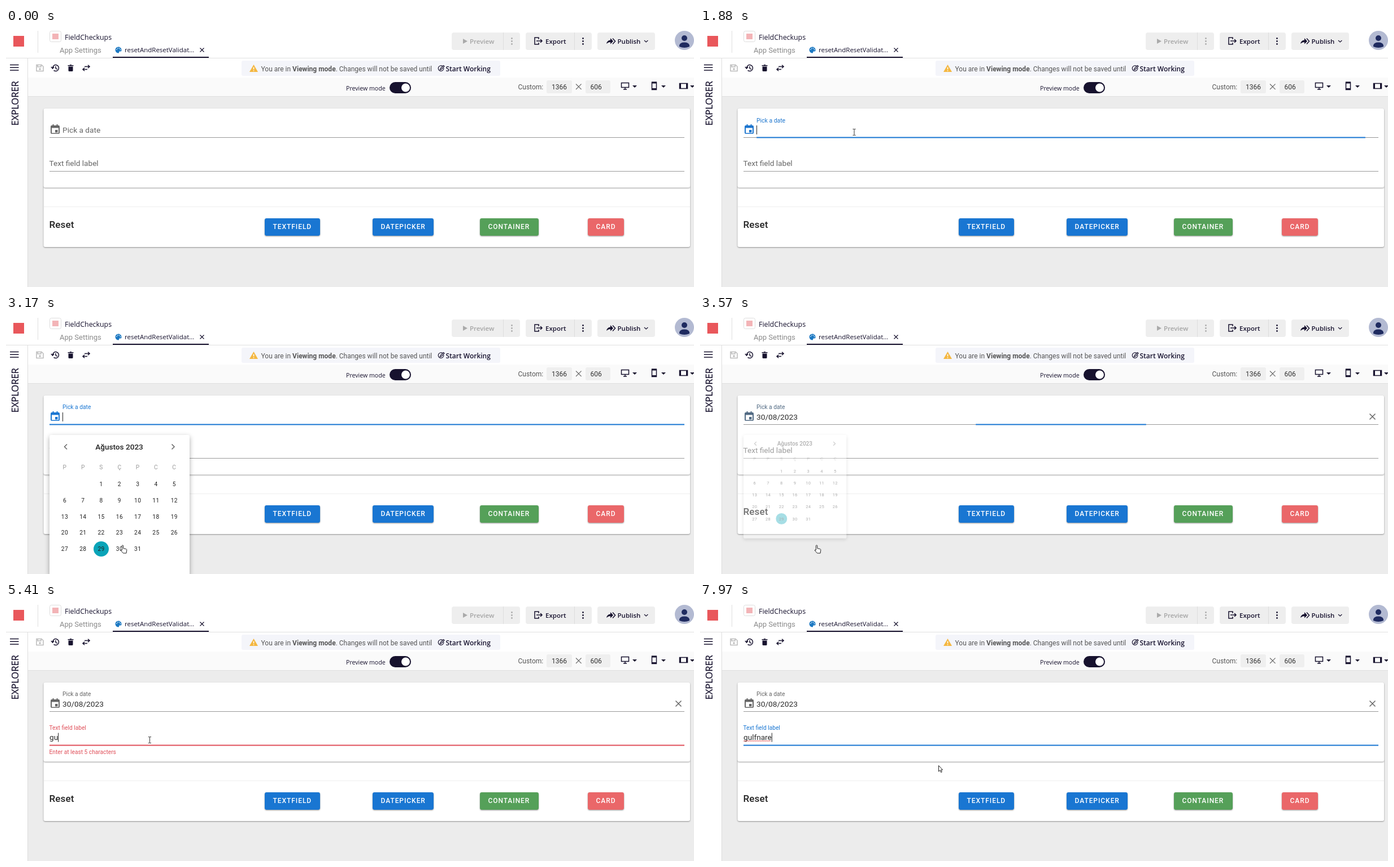
Recreate the animation shown at these times as an HTML page. Size 1218 by 460 pixels, loop 8000 ms.

```html
<!DOCTYPE html>
<html lang="en">
<head>
<meta charset="utf-8">
<style>
html, body { margin: 0; width: 100%; height: 100%; overflow: hidden; background: #ececec; }
svg { display: block; width: 100vw; height: 100vh; }
text { font-family: Roboto, sans-serif; font-size: 12px; fill: #555; white-space: pre; }
.ui { font-family: "Open Sans", sans-serif; font-size: 11.5px; fill: #17122e; }
.semi { font-weight: 600; }
.raised { filter: drop-shadow(0 1.5px 1px #0006); }
.popup { filter: drop-shadow(0 3px 4px #0005); }
.line { fill: none; stroke: #17122e; stroke-width: 1.5; }
.grey { stroke: #666; }
.dark { fill: #17122e; }
.btn text { font-size: 12px; font-weight: 500; letter-spacing: .95px; fill: #fff; }
#date text { font-size: 13.7px; }
#field text { font-size: 13.6px; }
#date .value, #field .value { fill: #2b2b2b; }
#field .error { font-size: 10.2px; fill: #e0505a; }
#popup text { text-anchor: middle; font-size: 10.2px; letter-spacing: .4px; fill: #222; }
#popup .week { fill: #999; }
#popup .month { font-size: 13.6px; font-weight: 500; letter-spacing: 0; }
</style>
</head>
<body>
<svg viewBox="0 0 1218 460" preserveAspectRatio="none">
  <!-- header -->
  <rect width="1218" height="122" fill="#fff"/>
  <rect x="39" y="88" width="1179" height="33" fill="#fafafa"/>
  <path d="M0 53.5H1218M39 121.5H1218M56.5 5V44" stroke="#e0e0e0"/>
  <rect x="13" y="14" width="19" height="19" fill="#e9575b"/>
  <rect x="77.500" y="5.500" width="20" height="19" rx="3" fill="#fff" stroke="#ddd"/>
  <rect x="82" y="10" width="11" height="10" fill="#f3b4b7"/>
  <text class="ui" x="104" y="21" style="font-size:12.4px">FieldCheckups</text>
  <text x="95" y="43.500" style="font-size:13px;fill:#8a8a8a">App Settings</text>
  <path d="M199 33.500a5.500 5.500 0 1 0 0 11c2 0 .5-2.500 2-3h2q2-.5 1.500-3a5.500 5.500 0 0 0-5.500-5z" fill="#1b78c2"/>
  <path d="M196 38h0M198 36h0M201 36h0M202.500 38.500h0" stroke="#fff" stroke-width="1.700" stroke-linecap="round"/>
  <text class="ui" x="210" y="43">resetAndResetValidat...</text>
  <path class="line" stroke-width="1" d="M343.500 35.500l7 7m0-7l-7 7" style="stroke-width:1.200"/>
  <rect class="dark" x="189" y="51" width="170" height="2"/>

  <g fill="#eee">
    <rect x="789" y="8" width="121" height="31" rx="4"/>
    <rect x="920" y="8" width="117" height="31" rx="4"/>
    <rect x="1047" y="8" width="102" height="31" rx="4"/>
  </g>
  <path d="M880.500 8v31M1006.500 8v31" stroke="#ddd"/>
  <path d="M809 19l8 4.500-8 4.500z" fill="#aaa"/>
  <text class="ui semi" x="821" y="28" style="fill:#a5a5a5">Preview</text>
  <path d="M895.500 18.500h0m0 5h0m0 5h0" stroke="#aaa" stroke-width="2.800" stroke-linecap="round"/>
  <path class="line" d="M943 20v-3h-7v12h7v-3M939 23h10m-3-3l3 3-3 3"/>
  <text class="ui semi" x="955" y="27.500">Export</text>
  <path d="M1021.500 18.500h0m0 5h0m0 5h0" stroke="#17122e" stroke-width="2.800" stroke-linecap="round"/>
  <path class="dark" d="M1063 28q1-6 7-6.500V18l5 5.500-5 5v-3.500q-4 0-7 3z"/>
  <path class="line" d="M1074 18.500l4.500 5-4.500 5"/>
  <text class="ui semi" x="1082.500" y="28">Publish</text>
  <path class="line" d="M1130 22l3.200 3 3.200-3" style="stroke-width:1.200"/>
  <circle cx="1201" cy="22" r="17" fill="#b3bad2"/>
  <circle cx="1201" cy="18" r="5" fill="#1f2b60"/>
  <path d="M1192 33v-2q1-5.500 9-5.500t9 5.500v2q-9 4-18 0z" fill="#1f2b60"/>

  <!-- tool rows -->
  <path d="M54 65.500h9l3 3v8h-12zM56 66v3h6v-3" fill="none" stroke="#bbb" stroke-width="1.500"/>
  <circle cx="60" cy="73" r="1.800" fill="#bbb"/>
  <path class="line" d="M82.500 71a5.500 5.500 0 1 1 2 4.300M88 68v3.500l3 2M80 69l2.500 3 2.500-3"/>
  <path class="dark" d="M109.500 66h3l1-1h2l1 1h3v1.500h-10zM110.500 68.500h8v7q0 1.500-1.500 1.500h-5q-1.500 0-1.500-1.500z"/>
  <path class="line" d="M139 68.500h9m-3-2.700l3 2.700-3 2.700M144 73.500h-8m3-2.700l-3 2.700 3 2.700"/>
  <rect x="417" y="58" width="458" height="27" rx="3" fill="#f4f5fa"/>
  <path d="M438.500 65l7.500 13h-15z" fill="#f4b740"/>
  <path d="M438.500 69.500v4m0 1.500v1.500" stroke="#fff" stroke-width="1.500"/>
  <text x="451.500" y="76.500">You are in <tspan font-weight="700">Viewing mode</tspan>. Changes will not be saved until</text>
  <path class="line" d="M773 67.800a4.800 4.800 0 1 0 1.800 3M768.500 74l.8-2.500 5.200-5 1.500 1.500-5 5.200z" style="stroke-width:1.200"/>
  <text class="ui semi" x="778.500" y="76.500" style="font-size:12px">Start Working</text>
  <text class="ui" x="602" y="110.500" style="font-size:10.600px">Preview mode</text>
  <rect class="dark" x="679" y="96" width="38" height="20" rx="10"/>
  <circle cx="707.500" cy="106" r="7.500" fill="#fff"/>
  <text x="906.500" y="109">Custom:</text>
  <rect x="957" y="93" width="45" height="23" rx="3" fill="#efefef"/>
  <rect x="1026" y="93" width="44" height="23" rx="3" fill="#efefef"/>
  <text x="966" y="109" style="fill:#333">1366</text>
  <text x="1034.500" y="109" style="fill:#333">606</text>
  <path class="line grey" d="M1009 99.500l9.500 9.500m0-9.500l-9.500 9.500" style="stroke-width:1.100"/>
  <path class="line" d="M1089.500 97.500h13v8h-13zM1096 106v3m-3 0h6M1143.500 96.500h8v13h-8zM1192.500 98.500h14v9h-14z"/>
  <path class="dark" d="M1109 102h8l-4 4zM1160 102h8l-4 4zM1211 102h8l-4 4zM1143 95.500h9v3h-9zM1143 107h9v3h-9zM1192 98h3v10h-3zM1204 98h3v10h-3z"/>

  <!-- sidebar -->
  <rect y="54" width="38" height="406" fill="#fff"/>
  <path d="M38.500 54V460" stroke="#ddd"/>
  <path class="line" d="M7 65.500h15.500M7 70.200h15.500M7 75h15.500"/>
  <text class="ui" transform="translate(21.500 173.500) rotate(-90)" style="font-size:16.500px;stroke:#17122e;stroke-width:.25">EXPLORER</text>

  <!-- cards -->
  <rect class="raised" x="66.500" y="280" width="1144.500" height="109" rx="3" fill="#fff"/>
  <rect class="raised" x="66.500" y="143" width="1144.500" height="140.500" rx="3" fill="#fff"/>
  <path d="M67 317.500H1211" stroke="#eee"/>
  <text x="76.500" y="355" style="font-size:17px;font-weight:500;fill:#222;letter-spacing:.13px">Reset</text>
  <g id="buttons"></g>

  <g id="date">
    <path d="M77 194.500H1201" stroke="#999"/>
    <rect class="hover" x="77" y="194" width="1124" height="1" fill="#222"/>
    <rect class="bar" y="193.500" height="2" fill="#1976d2"/>
    <g class="tint">
      <path fill-rule="evenodd" d="M81 173h1.500v-2h2v2h5v-2h2v2h1.500q2 0 2 2v11q0 2-2 2h-12q-2 0-2-2v-11q0-2 2-2zM81 177.500v9h12v-9zM87 181h4.500v4.500h-4.500z"/>
      <text class="label" style="fill:inherit">Pick a date</text>
    </g>
    <text class="value" x="100" y="185.500"></text>
    <path class="clear line grey" d="M1185.500 175.500l10 10m0-10l-10 10"/>
    <rect class="caret" x="100" y="173" width="1" height="16" fill="#222"/>
  </g>

  <g id="field">
    <path d="M77 254.500H1201" stroke="#999"/>
    <rect class="hover" x="77" y="254" width="1124" height="1" fill="#222"/>
    <rect class="bar" y="253.500" height="2"/>
    <text class="label">Text field label</text>
    <text class="value" x="77" y="245"></text>
    <path class="squiggle" fill="none" stroke="#e03030" stroke-width=".9"/>
    <text class="error" x="76.500" y="270">Enter at least 5 characters</text>
    <rect class="caret" y="232.500" width="1" height="16" fill="#222"/>
  </g>

  <g id="popup">
    <rect class="popup" width="248" height="250" rx="3" fill="#fff"/>
    <path class="line grey" d="M31 16.500l-4.500 4.500 4.500 4.500M216.500 16.500l4.500 4.500-4.500 4.500"/>
    <text class="month" x="123.500" y="26">Ağustos 2023</text>
    <circle cx="91.500" cy="202.500" r="13.500" fill="#0aa4b8"/>
    <g id="days"></g>
  </g>

  <circle id="ring" r="10" fill="#fff04a" opacity=".85"/>
  <g id="cursor" stroke-linejoin="round">
    <path class="arrow" d="M.5 .5v10.500l2.400-2.200 1.700 3.800 1.700-.8-1.700-3.700h3z" fill="#fff" stroke="#222"/>
    <path class="beam" d="M-2.500 -5.500h2l.5.500.5-.5h2M-2.500 5.500h2l.5-.5.5.5h2M0 -5v10" fill="none" stroke="#333"/>
    <path class="hand" d="M.3 1.500q1.200-1.500 2.400 0v5l4.800 1q1.500.5 1.300 2l-.8 5.500h-5.500l-4.500-5q0-1.600 2.300-.3z" fill="#fff" stroke="#222"/>
  </g>
</svg>
<script>
const LOOP = 8000, WORD = 'gulfnare', BLUE = '#1976d2', RED = '#e0505a', GREY = '#666';
const KEYS = [5210, 5350, 5550, 5780, 6000, 6160, 6370, 6640];
const BLINK = 530;
// cursor stops: time, x, y
const PATH = [[710, 372, 475], [1280, 292, 203], [1490, 273, 185], [2490, 273, 185], [3170, 205, 408],
  [3640, 205, 408], [4060, 245, 240], [4400, 245, 240], [4800, 254.5, 245], [7700, 254.5, 245], [7970, 422, 290]];

const $ = s => document.querySelector(s);
const set = (s, attrs) => { for (const k in attrs) $(s).setAttribute(k, attrs[k]); };
const show = (s, on) => $(s).setAttribute('opacity', +on);
const mix = (a, b, p) => `color-mix(in srgb, ${b} ${p * 100}%, ${a})`;

$('#buttons').innerHTML = [[458, 98, 'TEXTFIELD', BLUE], [649, 108, 'DATEPICKER', BLUE],
  [839, 104, 'CONTAINER', '#55a059'], [1030, 64, 'CARD', '#ea6769']].map(([x, w, label, color]) =>
  `<g class="btn"><rect class="raised" x="${x}" y="338" width="${w}" height="31" rx="3.4" fill="${color}"/>
  <text x="${x + 14.5}" y="357.300">${label}</text></g>`).join('');

const cell = (i, y, label, cls) => `<text class="${cls}" x="${27 + 32.3 * i}" y="${y}">${label}</text>`;
$('#days').innerHTML = [...'PPSÇPCC'].map((c, i) => cell(i, 61, c, 'week')).join('') +
  Array.from({ length: 31 }, (_, d) => cell((d + 2) % 7, 91 + 28.8 * Math.floor((d + 2) / 7), d + 1, 'day')).join('');

function cursorAt(t) {
  const i = PATH.findIndex(k => k[0] > t);
  if (i < 0) return PATH.at(-1).slice(1);
  if (!i) return PATH[0].slice(1);
  const [a, b] = [PATH[i - 1], PATH[i]];
  const u = (t - a[0]) / (b[0] - a[0]), p = u * u * (3 - 2 * u);
  return [1, 2].map(k => a[k] + (b[k] - a[k]) * p);
}

function draw(t) {
  const ease = (start, ms = 200) => 1 - (1 - Math.min(1, Math.max(0, (t - start) / ms))) ** 3;
  const between = (a, b) => t >= a && t < b;
  const bar = (s, p) => set(s, { x: 639 - 562 * p, width: 1124 * p });
  const label = (s, x, y, p) =>
    set(s, { transform: `translate(${x} ${y - 18.3 * p}) scale(${1 - .25 * p})` });
  const blink = start => t >= start && Math.floor((t - start) / BLINK) % 2 === 0;

  // date picker
  const focus = ease(1750) - ease(3500), picked = t >= 3450;
  bar('#date .bar', focus);
  label('#date .label', 100, 185.5, ease(1750));
  $('#date .tint').style.fill = mix(GREY, BLUE, focus);
  $('#date .value').textContent = picked ? '30/08/2023' : '';
  show('#date .clear', picked);
  show('#date .caret', t < 3450 && blink(t < 1960 ? 1750 : 1960));
  set('#date .hover', { opacity: ease(1400) - ease(1750) });

  // calendar popup
  const open = ease(1916, 300) - ease(3480, 300);
  set('#popup', {
    transform: `translate(77 213) scale(${.6 + .4 * open})`,
    opacity: Math.min(1, open * 1.05)
  });

  // text field
  const typed = KEYS.filter(k => t >= k).length, last = typed ? KEYS[typed - 1] : 4280;
  const error = typed > 0 && typed < 5, active = ease(4282);
  const value = $('#field .value');
  value.textContent = WORD.slice(0, typed);
  const end = typed ? 77 + value.getComputedTextLength() : 76.5;
  bar('#field .bar', active);
  $('#field .bar').style.fill = error ? RED : BLUE;
  label('#field .label', 76.5, 245, active);
  $('#field .label').style.fill = error ? mix(BLUE, RED, ease(KEYS[0]))
    : typed ? mix(RED, BLUE, ease(6050, 400)) : mix(GREY, BLUE, active);
  show('#field .error', error);
  show('#field .caret', blink(last));
  set('#field .caret', { x: end });
  set('#field .hover', { opacity: ease(1080) - ease(1200, 400) + ease(3950) - ease(7750) });
  set('#field .squiggle', { d: 'M77 247.5' + 'l1.5 -1.5 1.5 1.5'.repeat((end - 77) / 3) });
  show('#field .squiggle', t >= 7710);

  // pointer
  const [x, y] = cursorAt(t), popup = between(2000, 3600);
  const inDate = y > 170 && y < 197, inField = y > 227 && y < 258 && !popup;
  const kind = inDate || inField ? 'beam' : popup && y > 290 ? 'hand' : 'arrow';
  set('#cursor', { transform: `translate(${x} ${y})` });
  for (const k of ['arrow', 'beam', 'hand']) show(`#cursor .${k}`, k === kind);
  set('#ring', { cx: x, cy: y });
  $('#ring').style.display = between(1610, 1880) || between(3300, 3500) || between(4130, 4450) ? '' : 'none';
}

function tick() {
  draw(performance.now() % LOOP);
  requestAnimationFrame(tick);
}
tick();
</script>
</body>
</html>
```
